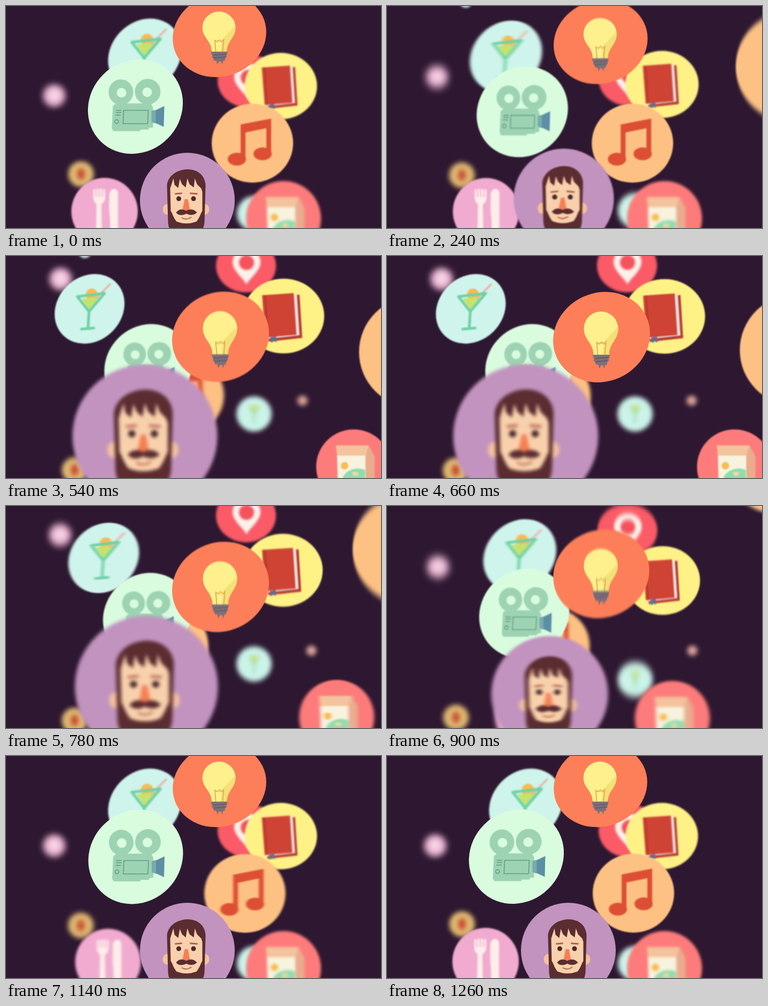
An HTML page for the animation above (1.32 s loop, 700x416 px).

```html
<!DOCTYPE html>
<html lang="en">
<head>
<meta charset="utf-8">
<title>Floating bubbles</title>
<style>
html, body { margin: 0; width: 100%; height: 100%; overflow: hidden; background: #2e1831; }
svg { display: block; width: 100%; height: 100%; }
</style>
</head>
<body>
<svg id="stage" viewBox="0 0 700 416"><defs></defs></svg>
<script>
const LOOP = 1320, STEP = 60;
const stage = document.getElementById('stage');
const defs = stage.querySelector('defs');

const oval = (fill, rx, ry = rx, x = 0, y = 0, turn = 0) =>
  `<ellipse cx="${x}" cy="${y}" rx="${rx}" ry="${ry}" fill="${fill}" transform="rotate(${turn})"/>`;
const shape = (fill, d) => `<path fill="${fill}" d="${d}"/>`;
const line = (color, width, d, extra = '') =>
  `<path fill="none" stroke="${color}" stroke-width="${width}" stroke-linecap="round" d="${d}" ${extra}/>`;

const art = {
  dot: oval('#e9b3d1', 21) + oval('#fbdfea', 9, 9, 0, -1),
  seed: oval('#deb871', 24) + oval('#c84a2e', 7, 11),
  speck: oval('#dda399', 9.5),
  lilac: oval('#a981ad', 32),
  pale: oval('#c9e4df', 12),
  peach: oval('#fdc283', 104),

  mini: oval('#cbf3ea', 33) + shape('#a3dfae', 'M-11 -15H11L2 2V18H-2V2Z') + oval('#cbdc78', 8, 5, 1, -11),

  pin: oval('#fb5b66', 56, 50) +
    shape('#fcf1ea', 'M1 35C-5 23 -25 10 -25 -7A26 25 0 0 1 27 -7C27 10 7 23 1 35Z') +
    oval('#f4525d', 14, 14, 1, -6),

  book: oval('#fef186', 76, 70) +
    shape('#b93a31', 'M-36 -37L30 -40L35 41L-28 48Z') +
    shape('#e9dfe0', 'M-36 -37L25 -41L30 36L-31 43Z') +
    shape('#ce4334', 'M-40 -39L19 -43L24 35L-34 40Z') +
    line('#a9332d', 2, 'M-34 -38L-29 39') +
    shape('#5d6e91', 'M-25 40L-14 38L-13 49L-18 47L-23 50Z'),

  carton: oval('#fd7c7b', 70) +
    shape('#e9ad8e', 'M18 -22L28 -40L39 -20V50H22Z') +
    shape('#f2c39d', 'M-33 -40H28L22 -20H-31Z') +
    shape('#f8f3de', 'M-31 -21H22V50H-29Z') +
    oval('#f6bd55', 7, 7, -17, -2) +
    shape('#8edcaf', 'M-20 19C-12 4 8 0 21 6V26H-20Z') +
    oval('#f4d6a1', 6, 4, 3, 13),

  cutlery: oval('#f2abd0', 62, 63) +
    line('#fdeee9', 4, 'M-19 -40V-25M-13 -41V-25M-7 -41V-25M-1 -40V-25') +
    shape('#fdeee9', 'M-21 -27H1Q1 -17 -6 -14L-5 45H-16L-15 -14Q-21 -17 -21 -27Z') +
    shape('#fdeee9', 'M9 -34Q12 -44 20 -42Q26 -40 25 -30V45H11L10 10Q8 5 9 -34Z'),

  drink: oval('#cff4ec', 70, 60, 0, 0, -45) +
    oval('#f9b953', 11, 11, 4, -27) +
    shape('#c5e36c', 'M-15 -19L20 -23L-1 1Z') +
    line('#e9b3a8', 3.5, 'M12 -20L38 -46') +
    line('#6ed1a4', 5, 'M-23 -23L28 -29L-1 5Z', 'stroke-linejoin="round"') +
    line('#6ed1a4', 5, 'M-1 5L-3 36M-15 38L8 36'),

  camera: oval('#d9fcde', 92, 85, 0, 0, -45) +
    oval('#9dd3b3', 23, 24, -27, -27) + oval('#9dd3b3', 24, 24, 23, -28) +
    oval('#d9fcde', 9, 9, -26, -26) + oval('#d9fcde', 9, 9, 22, -27) +
    shape('#9dd3b3', 'M-36 -6H29L33 2V39L25 40V43H9V46H-41L-44 41L-42 -1Z') +
    shape('#5c8fa5', 'M33 9L54 -1L53 38L34 29Z') + shape('#78aaae', 'M30 8L38 6V32L30 29Z') +
    line('#5f9984', 1.6, 'M-22 7H24L23 32H-23Z', 'stroke-dasharray="4 1.5"') +
    line('#5f9984', 1.6, 'M-36 7H-27M-36 11H-27M-37 16H-28') +
    `<circle cx="-35" cy="28" r="3.5" fill="none" stroke="#5f9984" stroke-width="1.5"/>`,

  note: oval('#fdc183', 76, 74) +
    oval('#dd4f34', 17, 12, -29, 30) + oval('#dd4f34', 17, 12, 19, 20) +
    shape('#dd4f34', 'M-22 -35L35 -46V20H26V-28L-13 -20V30H-22Z'),

  bulb: oval('#fc7f59', 92, 83, 0, 0, -25) +
    shape('#fdf08d', 'M-15 34C-15 10 -33 6 -33 -16A32 32 0 0 1 31 -16C31 6 14 10 14 34Z') +
    shape('#f3e077', 'M31 -20C32 6 14 10 14 34H2L5 8Z') +
    line('#e5a94c', 1.8, 'M-7 34L-9 10L-4 13L0 9L4 13L8 9L6 34') +
    shape('#7c7079', 'M-16 33H15V38L13 40L14 44L11 46L10 52H7L5 59L3 53H-1L-4 59L-6 52L-11 51L-12 46L-15 44L-13 40L-16 38Z') +
    line('#5b5361', 1.3, 'M-13 40L13 38M-11 46L11 44'),

  face: oval('#c293bf', 88.5, 89) +
    oval('#f3c29f', 8, 10, -38, 17) + oval('#f3c29f', 8, 10, 33, 17) +
    shape('#5b2c30', 'M-38 -28C-37 -42 -24 -57 0 -58C20 -58 33 -46 34 -28L32 42Q29 70 -3 72Q-34 69 -36 42Z') +
    shape('#f8d1ac', 'M-32 -22L-26 -41L-24 -29L-17 -23L-14 -40L-10 -30L-3 -24L0 -41L4 -30L12 -24L14 -41L18 -30L26 -22L28 -16V20C25 24 23 33 17 40Q-2 47 -20 40C-26 33 -28 24 -31 20Z') +
    line('#b2604f', 3, 'M-22 -12L-11 -13M6 -13L18 -12') +
    oval('#4a292b', 4.5, 4.5, -16, -3) + oval('#4a292b', 4.5, 4.5, 11.5, -3) +
    shape('#f57f55', 'M-5 -2H1L5 18Q4 24 -2 24Q-9 24 -9 18Z') +
    shape('#5b2c30', 'M-2 20C4 16 12 16 18 23C12 29 3 28 -2 25C-8 29 -17 29 -21 23C-16 16 -8 16 -2 20Z') +
    line('#b4614d', 2, 'M-10 33Q-2 38 7 32')
};

// Poses are x, y, horizontal scale, vertical scale, blur; times are start and end of each move.
const bubbles = [
  { art: 'lilac', a: [428, -48, 1, 1, 2], b: [444, 8, 1, 1, 2], out: [130, 570], back: [740, 1000] },
  { art: 'pale', a: [148, -30, 1, 1, 2], b: [147, -8, 1, 1, 2], out: [0, 300], back: [540, 780] },
  { art: 'speck', a: [480, 271, 1, 1, 4], b: [570, 271, 1, 1, 4], out: [155, 755], back: [880, 1260] },
  { art: 'dot', a: [90, 168, 1, 1, 6], b: [102, 43, 1, 1, 6], out: [56, 502], back: [641, 1135] },
  { art: 'seed', a: [140, 315, 1, 1, 4.5], b: [128, 402, 1, 1, 4.5], out: [160, 600], back: [790, 1224] },
  { art: 'mini', a: [464, 389, 1, 1, 4.5], b: [463, 296, 1, 1, 4.5], out: [147, 524], back: [780, 1060] },
  { art: 'pin', a: [451, 140, 1, 1, 2.2], b: [448, 18, 1, 1, 2], out: [164, 576], back: [780, 1092] },
  { art: 'book', a: [513, 150, .89, .89, 1.5], b: [518, 112.5, 1, 1, .9], out: [160, 453], back: [571, 1129] },
  { art: 'carton', a: [518, 398, 1, 1, 2.6], b: [649, 395, 1, 1, 1.1], out: [270, 535], back: [625, 1020] },
  { art: 'cutlery', a: [184, 385, 1, 1, 1.7], b: [256, 396, .87, .87, 5], out: [155, 755], back: [860, 1250] },
  { art: 'drink', a: [259, 92, 1.05, 1.05, 1.7], b: [156, 99, 1, 1, 1], out: [56, 467], back: [620, 1020] },
  { art: 'note', a: [460, 257, 1, 1, 1], b: [304, 262, .97, .97, 3], out: [155, 755], back: [860, 1250] },
  { art: 'camera', a: [241.5, 188.5, 1, 1, .7], b: [265, 209, .92, .92, 1.1], out: [0, 490], back: [600, 1260] },
  { art: 'peach', a: [727, -112, 1, 1, 1.7], b: [763, 180, 1, 1, .9], out: [0, 390], back: [600, 1010] },
  { art: 'bulb', a: [398.5, 55, .965, .925, .7], b: [400.5, 152, 1, 1, .7], out: [71, 606], back: [740, 1140] },
  { art: 'face', a: [338.5, 364, 1, 1, .7], b: [259, 337.5, 1.53, 1.51, 2.1], out: [91, 589], back: [696, 1087] }
];

const ease = u => u < .5 ? 4 * u ** 3 : 1 - 4 * (1 - u) ** 3;
const ramp = (t, [from, to]) => ease(Math.min(1, Math.max(0, (t - from) / (to - from))));

function poseAt({ a, b, out, back }, t) {
  const p = ramp(t, out) - ramp(t, back);
  return a.map((v, i) => v + (b[i] - v) * p);
}

for (const [i, bubble] of bubbles.entries()) {
  defs.insertAdjacentHTML('beforeend',
    `<filter id="blur${i}" x="-50%" y="-50%" width="200%" height="200%" color-interpolation-filters="sRGB"><feGaussianBlur/></filter>`);
  stage.insertAdjacentHTML('beforeend', `<g filter="url(#blur${i})">${art[bubble.art]}</g>`);
  bubble.node = stage.lastElementChild;
  bubble.blur = defs.lastElementChild.firstElementChild;
}

function draw(t) {
  for (const bubble of bubbles) {
    const [x, y, sx, sy, soft] = poseAt(bubble, t);
    const before = poseAt(bubble, t - STEP / 2), after = poseAt(bubble, t + STEP / 2);
    const smear = i => soft + Math.abs(after[i] - before[i]) * .05;
    bubble.node.setAttribute('transform', `translate(${x} ${y}) scale(${sx} ${sy})`);
    bubble.blur.setAttribute('stdDeviation', `${smear(0)} ${smear(1)}`);
  }
}

const start = performance.now();
let shown = -1;
function tick(now) {
  const t = Math.floor((Math.max(0, now - start) % LOOP) / STEP) * STEP;
  if (t !== shown) draw(shown = t);
  requestAnimationFrame(tick);
}
draw(0);
requestAnimationFrame(tick);
</script>
</body>
</html>
```
